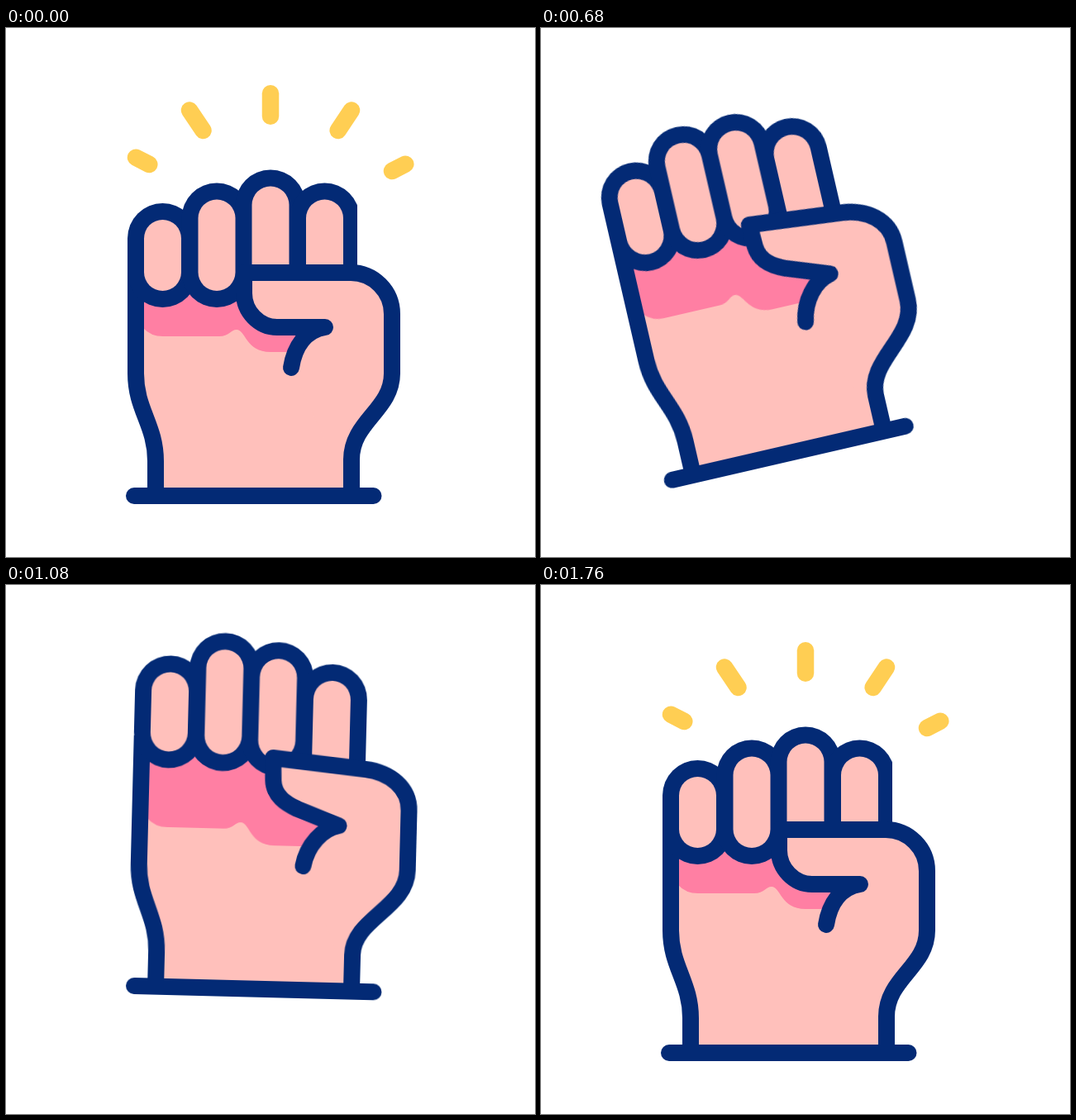
Write an HTML page without scripts that moves like this. It is 640 px wide and 640 px high and loops after 2 s.

```html
<!DOCTYPE html>
<html lang="en">
<head>
<meta charset="utf-8">
<title>Raised fist</title>
<style>
  :root { --navy: #032a75; --skin: #ffc0bb; --shade: #ff7fa3; --spark: #ffce53; }
  html, body { margin: 0; height: 100%; overflow: hidden; background: #fff; }
  svg { display: block; width: 100%; height: 100%; }
  path, line { fill: none; stroke-linecap: round; stroke-linejoin: round; }

  .rays { stroke: var(--spark); stroke-width: 20.5; }
  .line { stroke: var(--navy); stroke-width: 20; }
  .outer { stroke: var(--navy); stroke-width: 85; }
  .inner { stroke: var(--skin); stroke-width: 45; }
  .palm { fill: var(--skin); }
  .shadow { fill: var(--shade); }
  .thumb { fill: var(--skin); }
  .side { stroke-linecap: butt; }

  .lift, .tilt, .rays line, .thumb, .little, .ring, .middle, .index, .edge {
    animation: 2s infinite cubic-bezier(.55, 0, .65, 1);
  }
  .lift { animation-name: lift; }
  .tilt { animation-name: tilt; }
  .rays line { animation-name: ray; }
  .thumb { animation-name: thumb; }
  .little { animation-name: little; }
  .ring { animation-name: ring; }
  .middle { animation-name: middle; }
  .index { animation-name: index; }
  .edge { animation-name: edge; animation-timing-function: step-end; }

  @keyframes lift {
    0%, 16% { transform: translateY(0); animation-timing-function: cubic-bezier(.5, 0, .6, 1); }
    47% { transform: translateY(-89px); animation-timing-function: ease-in-out; }
    75%, 100% { transform: translateY(0); }
  }
  @keyframes tilt {
    0%, 16% { transform: rotate(0deg); }
    34% { transform: rotate(-13deg); animation-timing-function: cubic-bezier(.4, 0, .58, 1); }
    47% { transform: rotate(10.1deg); animation-timing-function: cubic-bezier(.35, 0, .6, 1); }
    60.5% { transform: rotate(-5.2deg); animation-timing-function: ease-in-out; }
    78%, 100% { transform: rotate(0deg); }
  }
  /* Rays shrink toward their outer ends, then grow back from the inner ends. */
  @keyframes ray {
    0%, 16% { stroke-dasharray: 100 200; stroke-dashoffset: 0; opacity: 1; animation-timing-function: ease-in-out; }
    27.9% { stroke-dasharray: .1 200; stroke-dashoffset: 0; opacity: 1; animation-timing-function: step-end; }
    28% { stroke-dasharray: .1 200; stroke-dashoffset: -99.8; opacity: 0; animation-timing-function: step-end; }
    71.8% { stroke-dasharray: .1 200; stroke-dashoffset: -99.8; opacity: 1; animation-timing-function: ease-in-out; }
    88%, 100% { stroke-dasharray: 100 200; stroke-dashoffset: 0; opacity: 1; }
  }
  @keyframes thumb {
    0%, 16%, 86%, 100% {
      d: path("M118 0L118 -44C118 -90 167 -104 167 -148L167 -220C167 -247.6 144.6 -270 117 -270L-12 -270L-12 -245C-12 -223 6 -204 28 -204L86 -204C62 -200 49 -180 45 -155");
    }
    36%, 55% {
      d: path("M118 0L118 -44C118 -88 182 -102 182 -148L182 -220C182 -248 158 -266 128 -269L16 -280L17 -253C18 -234 33 -225 47 -219L97.5 -200C78 -196 60 -176 55.6 -150");
    }
    71% {
      d: path("M118 0L118 -44C118 -90 167 -104 167 -148L167 -220C167 -258 138 -288 103 -285L-30 -272L-27 -250C-24 -224 -8 -206 13 -209L76 -215.4C56 -195 48 -178 43.5 -155");
    }
  }
  @keyframes little {
    0%, 16%, 80%, 100% { d: path("M-110.5 -311.5L-110.5 -270.5"); }
    43%, 54% { d: path("M-110.5 -358L-110.5 -307"); }
  }
  @keyframes ring {
    0%, 16%, 74%, 100% { d: path("M-45 -336L-45 -270.5"); }
    42%, 54% { d: path("M-45 -387L-45 -305"); }
  }
  @keyframes middle {
    0%, 16%, 70%, 100% { d: path("M20 -352L20 -270"); }
    40%, 54% { d: path("M20 -377.5L20 -301"); }
  }
  @keyframes index {
    0%, 16%, 67%, 100% { d: path("M85.5 -336L85.5 -280"); }
    34%, 54% { d: path("M85.5 -352.5L85.5 -280"); }
  }
  @keyframes edge {
    0%, 88%, 100% { width: 125px; }
    16% { width: 130px; }
  }
</style>
</head>
<body>
<svg viewBox="0 0 640 640">
  <clipPath id="edge"><rect class="edge" y="-420" width="125" height="300"/></clipPath>

  <g class="rays">
    <line x1="157" y1="156.7" x2="173.3" y2="165" pathLength="100"/>
    <line x1="222" y1="99.5" x2="238.5" y2="124" pathLength="100"/>
    <line x1="320" y1="79.3" x2="320" y2="106.7" pathLength="100"/>
    <line x1="418" y1="99.5" x2="401.7" y2="124" pathLength="100"/>
    <line x1="483.3" y1="164.7" x2="467" y2="173" pathLength="100"/>
  </g>

  <g transform="translate(300 566)">
    <g class="lift"><g class="tilt">
      <path class="palm" d="M-143 -290V-148C-143 -104 -119 -86 -119 -42V0H118V-44L100 -200L60 -230L20 -290Z"/>
      <path class="shadow" d="M-134 -290V-203Q-125 -193 -110 -193H-42C-30 -193 -28 -201 -21 -201C-10 -201 -10 -174 20 -174H56L92 -204V-225L20 -290Z"/>
      <path class="line side" d="M-143 -303V-148C-143 -104 -119 -86 -119 -42V0"/>

      <g class="outer">
        <path class="little" d="M-110.5 -311.5L-110.5 -270.5"/>
        <path class="ring" d="M-45 -336L-45 -270.5"/>
        <path class="middle" d="M20 -352L20 -270"/>
        <g clip-path="url(#edge)"><path class="index" d="M85.5 -336L85.5 -280"/></g>
      </g>
      <g class="inner">
        <path class="little" d="M-110.5 -311.5L-110.5 -270.5"/>
        <path class="ring" d="M-45 -336L-45 -270.5"/>
        <path class="middle" d="M20 -352L20 -270"/>
        <path class="index" d="M85.5 -336L85.5 -280"/>
      </g>

      <path class="line thumb" d="M118 0L118 -44C118 -90 167 -104 167 -148L167 -220C167 -247.6 144.6 -270 117 -270L-12 -270L-12 -245C-12 -223 6 -204 28 -204L86 -204C62 -200 49 -180 45 -155"/>
      <path class="line" d="M-145 0H144.5"/>
    </g></g>
  </g>
</svg>
</body>
</html>
```
